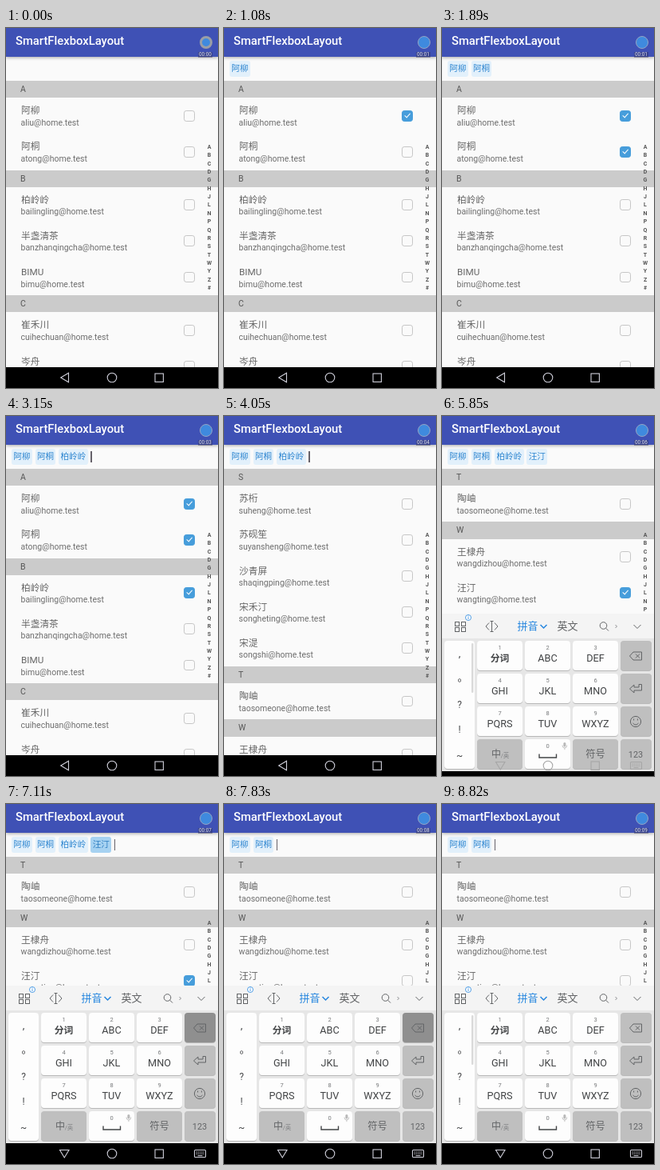
Write an HTML page that moves like this. It is 266 px wide and 450 px high and loops after 8.91 s.

```html
<!DOCTYPE html>
<html lang="zh-CN">
<head>
<meta charset="utf-8">
<title>SmartFlexboxLayout</title>
<style>
html, body { margin: 0; width: 100%; height: 100%; overflow: hidden; background: #fafafa; }
#stage {
  position: relative; width: 266px; height: 450px; overflow: hidden; background: #fafafa;
  font-family: Roboto, "Noto Sans CJK SC", "Noto Sans CJK", sans-serif;
}
#stage div, #stage svg { position: absolute; box-sizing: border-box; white-space: nowrap; }
#bar { width: 266px; height: 36px; background: #3f51b5; box-shadow: 0 1px 4px rgba(0,0,0,.35); }
#title { left: 12px; top: 6px; line-height: 20px; font-size: 14.8px; font-weight: 500; color: #fff; }
#dot { left: 243px; top: 10px; width: 16px; height: 16px; border-radius: 50%; background: #3f8ade; border: 1.8px solid #93a3c4; }
#dot.idle { border: 3px solid #9a9ea6; }
#clock { left: 241px; top: 30px; width: 18px; height: 7px; background: rgba(40,40,80,.4); color: #e4e4ea; font-size: 6.4px; line-height: 7px; text-align: center; }
#field { left: 7px; top: 41px; height: 20px; display: flex; gap: 3.8px; align-items: center; }
#field .chip { position: static; height: 19.5px; line-height: 20.5px; padding: 0 2.3px; border-radius: 3px; background: #e2f0fb; color: #2f86d0; font-size: 10.6px; }
#field .chip.sel { background: #a6d2f1; color: #2f7fc2; }
#caret { width: 1.3px; height: 14px; background: #66626a; }
#field #caret { position: static; }
#view { top: 66px; width: 266px; height: 358px; overflow: hidden; }
#list { width: 266px; }
.head { width: 266px; height: 21.3px; line-height: 22px; padding-left: 18px; background: #cbcbcb; color: #555; font-size: 10.5px; }
.row { width: 266px; height: 45.1px; }
.name { left: 19px; top: 7px; line-height: 18px; font-size: 11.7px; color: #666; }
.mail { left: 18.5px; top: 23.5px; line-height: 16px; font-size: 10.5px; color: #6e6e6e; }
.box { left: 222.8px; top: 15.5px; width: 13.8px; height: 13.8px; border: 1px solid #c6c6c6; border-radius: 3.2px; }
.row.on .box { background: #469ddb; border-color: #469ddb; }
.row.on .box::after {
  content: ""; position: absolute; left: 3.8px; top: 1px; width: 3px; height: 6.4px;
  border: solid #fff; border-width: 0 1.6px 1.6px 0; transform: rotate(42deg);
}
.letter { left: 245px; width: 20px; line-height: 10px; text-align: center; font-size: 7px; font-weight: 700; color: #555; }
#foot { top: 424px; width: 266px; height: 26px; background: #000; }
#keys { top: 227px; }
#nav { top: 424px; fill: none; stroke: #cfcfda; stroke-width: 1.1; }
#nav.over { stroke: #a6a6a6; }
</style>
</head>
<body>
<div id="stage">
  <div id="view"><div id="list"></div></div>
  <div id="index"></div>
  <div id="bar">
    <div id="title">SmartFlexboxLayout</div>
    <div id="dot"></div>
    <div id="clock"></div>
  </div>
  <div id="field"><div id="caret"></div></div>
  <div id="foot"></div>
  <svg id="keys" width="266" height="197" viewBox="0 227 266 197"></svg>
  <svg id="nav" width="266" height="26" viewBox="0 424 266 26">
    <path id="back"/>
    <circle cx="133" cy="437" r="5.8"/>
    <rect x="187" y="432" width="10.4" height="10.4"/>
    <g id="hide">
      <rect x="236.5" y="432.5" width="14" height="9" rx="1"/>
      <path d="M238.5 435h10M238.5 437.2h10" stroke-dasharray="1.4 .8"/>
      <path d="M240.5 439.6h6"/>
    </g>
  </svg>
</div>
<script>
const LOOP = 8910, STEP = 90, HEAD = 21.3, ROW = 45.1;
const people = {
  A: "阿柳 aliu,阿桐 atong",
  B: "柏岭岭 bailingling,半盏清茶 banzhanqingcha,BIMU bimu",
  C: "崔禾川 cuihechuan,岑舟 cenzhou",
  D: "杜汀 duting,丁禾舟 dinghezhou",
  G: "顾岫 guxiu,葛穗 gesui",
  H: "何汀屿 hetingyu,胡桁 huheng,侯岫 houxiu",
  J: "江穗禾 jiangsuihe,金桁 jinheng",
  L: "林岫禾 linxiuhe,柳湜 liushi,卢穗舟 lusuizhou",
  N: "倪汀 niting,宁桁 ningheng",
  P: "潘禾屿 panheyu,裴湜 peishi",
  Q: "秦穗 qinsui",
  R: "任岫舟 renxiuzhou,阮汀 ruanting",
  S: "苏桁 suheng,苏砚笙 suyansheng,沙青屏 shaqingping,宋禾汀 songheting,宋湜 songshi",
  T: "陶岫 taosomeone",
  W: "王棣舟 wangdizhou,汪汀 wangting,魏穗 weisui,温桁 wenheng",
  Y: "叶湜 yeshi,于禾 yuhe",
  Z: "周岫 zhouxiu,郑汀 zhengting",
  "#": "007 agent"
};
// add: ticked, mark: highlighted by the first backspace, del: removed by the second
const picks = [
  { name: "阿柳", add: 990 },
  { name: "阿桐", add: 1530 },
  { name: "柏岭岭", add: 2610, mark: 7470, del: 7830 },
  { name: "汪汀", add: 4950, mark: 6570, del: 7200 }
];
const jumps = [[0, "A"], [3780, "H"], [3870, "L"], [3960, "P"], [4050, "S"], [4230, "T"]];
const presses = [[6480, 6660], [7110, 7290], [7470, 7560], [7740, 7920]];
const KEYS_START = 5580, KEYS_END = 5940, KEYS_HEIGHT = 197;

const $ = id => document.getElementById(id);
const within = (t, a, b = Infinity) => t >= a && t < b;

function add(parent, cls, text = "", top) {
  const el = document.createElement("div");
  el.className = cls;
  el.textContent = text;
  if (top !== undefined) el.style.top = top + "px";
  parent.append(el);
  return el;
}

const heads = {}, rows = {};
let y = 0;
Object.entries(people).forEach(([letter, group], i) => {
  heads[letter] = y;
  add($("list"), "head", letter, y);
  y += HEAD;
  for (const person of group.split(",")) {
    const [name, user] = person.split(" ");
    const row = rows[name] = add($("list"), "row", "", y);
    add(row, "name", name);
    add(row, "mail", user + "@home.test");
    add(row, "box");
    y += ROW;
  }
  add($("index"), "letter", letter, 144 + i * 10.35);
});

for (const p of picks) {
  p.chip = add($("field"), "chip", p.name);
  $("field").insertBefore(p.chip, $("caret"));
}

function buildKeys() {
  const cols = [44, 104, 164], rowY = r => 261 + r * 41;
  const text = (x, y, size, s, fill = "#424446", more = "") =>
    `<text x="${x}" y="${y}" font-size="${size}" fill="${fill}" ${more}>${s}</text>`;
  const key = (x, y, w, h, fill, id = "") =>
    `<rect x="${x}" y="${y + 1}" width="${w}" height="${h}" rx="4" fill="#b8b8b8"/>` +
    `<rect ${id} x="${x}" y="${y}" width="${w}" height="${h}" rx="4" fill="${fill}"/>`;
  const line = (d, color = "#626466", width = 1) =>
    `<path d="${d}" fill="none" stroke="${color}" stroke-width="${width}"/>`;
  const ring = (x, y, r) => `<circle cx="${x}" cy="${y}" r="${r}" fill="none" stroke="#626466"/>`;
  const gray = "#bfbfbf", white = "#fdfdfd", blue = "#2787df";

  let s = `<rect y="227" width="266" height="197" fill="#e6e6e6"/><rect y="227" width="266" height="31" fill="#f4f4f4"/>`;
  // toolbar
  for (const x of [16.5, 24.5]) for (const y of [237.5, 244.5])
    s += `<rect x="${x}" y="${y}" width="5" height="5" fill="none" stroke="#626466"/>`;
  s += `<circle cx="33" cy="232" r="3.5" fill="#fff" stroke="${blue}" stroke-width=".8"/>` + line("M33 231.4v2.4M33 229.6v1", blue, .9);
  s += line("M59 238.5l-4 4.5 4 4.5M66 238.5l4 4.5-4 4.5M60.5 236.5h4M60.5 249.5h4M62.5 236.5v13");
  s += text(107.5, 247, 13, "拼音", blue) + line("M123.5 241l4 4 4-4", blue, 1.5);
  s += text(157.5, 247, 13, "英文", "#606264");
  s += ring(202.5, 242, 4.3) + line("M205.6 245.2l3.4 3.4") + line("M217.500 241l2 2-2 2", "#8c8e90");
  s += line("M240.5 241l4.5 4.5 4.5-4.5");
  // punctuation column
  s += key(3, 261, 38, 160, white);
  s += text(22, 281, 13, ",") + text(26, 311, 13, "。") + text(22, 345, 12, "?") + text(22, 376, 12, "!") + text(22, 409, 12, "~");
  s += `<rect id="thumb" x="37" y="264" width="2.4" height="62" rx="1.2" fill="#dadada"/>`;
  // letter keys
  ["分词", "ABC", "DEF", "GHI", "JKL", "MNO", "PQRS", "TUV", "WXYZ"].forEach((label, i) => {
    const x = cols[i % 3], y = rowY(Math.floor(i / 3));
    s += key(x, y, 57, 37, white) + text(x + 28.5, y + 11, 7.5, i + 1, "#77797b");
    s += text(x + 28.5, y + 26, i ? 12.7 : 11.8, label, "#424446", i ? "" : 'font-weight="700"');
  });
  s += key(44, 384, 57, 37, gray) + text(68, 407, 12, "中", "#626466") + text(79, 406.5, 7.5, "/英", "#808284");
  s += key(104, 384, 57, 37, white) + text(132.5, 395, 7.5, 0, "#77797b") + line("M122 402.500v4.500h21.5v-4.500", "#424446", 1.4);
  s += `<rect x="152.4" y="388" width="3" height="5.5" rx="1.5" fill="#b8b8b8"/>` + line("M151 391.5q0 3.5 2.9 3.5t2.9-3.5M153.9 395v2.2", "#b8b8b8", .8);
  s += key(164, 384, 57, 37, gray) + text(192.5, 407, 12.3, "符号", "#626466");
  // function column
  for (let r = 0; r < 4; r++) s += key(224, rowY(r), 39, 37, gray, r ? "" : 'id="erase"');
  s += line("M235.5 280l4.5-5h10.5v10h-10.5zM243 277.5l5 5M248 277.5l-5 5");
  s += line("M235.5 321l5.500-5v3h6v-3.500h3.500v7.500h-9.500v3z");
  s += ring(243, 362, 6.6) + line("M239.5 364q3.5 4 7 0M240.6 358.500v2M245.4 358.500v2");
  s += text(243, 406.5, 10.9, "123", "#626466");
  $("keys").innerHTML = `<g text-anchor="middle">${s}</g>`;
}
buildKeys();

function caretOn(t) {
  if (t >= 7830) return !within(t, 8370, 8820);
  return (t - 290 + 940) % 940 < 450;
}

function draw(now) {
  const t = Math.floor(now % LOOP / STEP) * STEP;

  const [, letter] = jumps.filter(j => j[0] <= t).pop();
  $("list").style.top = -heads[letter] + "px";

  for (const p of picks) {
    const on = within(t, p.add, p.del);
    p.chip.style.display = on ? "" : "none";
    p.chip.classList.toggle("sel", t >= p.mark);
    rows[p.name].classList.toggle("on", on);
  }
  $("caret").style.visibility = caretOn(t) ? "visible" : "hidden";

  const open = t > KEYS_START, p = Math.min(1, (t - KEYS_START) / (KEYS_END - KEYS_START));
  $("keys").style.display = open ? "" : "none";
  if (open) $("keys").style.top = 227 + KEYS_HEIGHT * (1 - p) ** 1.65 + "px";
  $("erase").setAttribute("fill", presses.some(([a, b]) => within(t, a, b)) ? "#8f8f8f" : "#bfbfbf");
  $("thumb").style.display = within(t, 6480, 8640) ? "none" : "";

  $("nav").classList.toggle("over", open && p < 1);
  $("back").setAttribute("d", open ? "M67.5 432.5h11.5l-5.75 9.5z" : "M78.5 431.2v11.5l-9.8-5.75z");
  $("hide").style.display = open ? "" : "none";

  $("dot").className = t < STEP ? "idle" : "";
  $("clock").textContent = "00:0" + Math.floor(t * 1.03 / 1000);
}

const start = performance.now();
function tick() {
  draw(performance.now() - start);
  requestAnimationFrame(tick);
}
tick();
</script>
</body>
</html>
```
